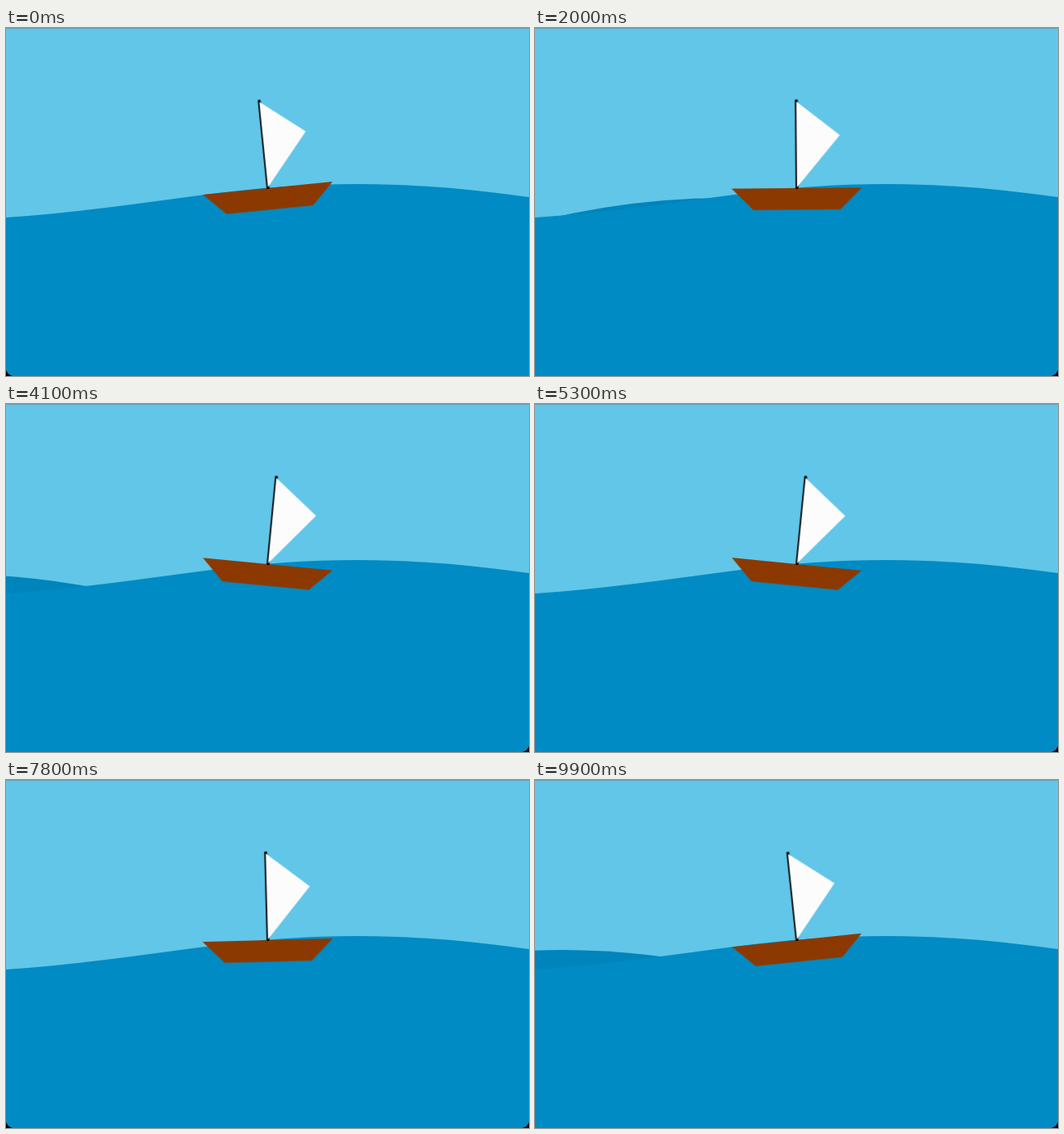
Animation, 640 px wide and 426 px high, one loop 10 s. Source, as an HTML page without scripts:

```html
<!DOCTYPE html>
<html lang="en">
<head>
<meta charset="utf-8">
<title>Sailing boat</title>
<style>
  html, body {
    margin: 0;
    width: 100%;
    height: 100%;
    overflow: hidden;
    background: #000;
  }
  svg {
    display: block;
    width: 100%;
    height: 100%;
  }
  .scene { clip-path: inset(0 round 0 0 10px 10px); }

  .swell { animation: drift 10s linear infinite; }
  .boat {
    transform-origin: 320.5px 196px;
    animation: rock 10s infinite;
  }

  /* One crossing takes 6.5s, then the swell starts again from the right */
  @keyframes drift {
    0% { transform: translateX(520px); }
    65% { transform: translateX(-413px); }
    65.001% { transform: translateX(520px); }
    100% { transform: translateX(17.7px); }
  }

  /* Sine rocking, entered shortly after its lowest point */
  @keyframes rock {
    0% {
      transform: rotate(-5.74deg);
      animation-timing-function: cubic-bezier(.333, .13, .667, .556);
    }
    21.3% {
      transform: rotate(0deg);
      animation-timing-function: cubic-bezier(.333, .524, .667, 1);
    }
    47.5% {
      transform: rotate(6deg);
      animation-timing-function: cubic-bezier(.3642, 0, .6358, 1);
    }
    100% { transform: rotate(-6deg); }
  }
</style>
</head>
<body>
<svg viewBox="0 0 640 426" preserveAspectRatio="none">
  <g class="scene">
    <rect width="640" height="426" fill="#62c6e8"/>
    <rect width="640" height="1" fill="#6b9fb5"/>
    <path class="swell" d="M-300 256.6Q0 159.4 300 256.6Z" fill="#0084bc"/>
    <path d="M0 232C80 227 160 215 240 204.5C310 195 370 191 430 191C500 191 570 197 640 207V426H0Z" fill="#008bc4"/>
    <g class="boat">
      <path d="M240.5 196H400L373.5 222.5H267Z" fill="#8b3900"/>
      <rect x="318.8" y="87.5" width="3.6" height="109.5" rx="1"/>
      <path d="M320.6 90L373.5 131.4L320.6 195Z" fill="#fcfcfc"/>
    </g>
  </g>
</svg>
</body>
</html>
```
